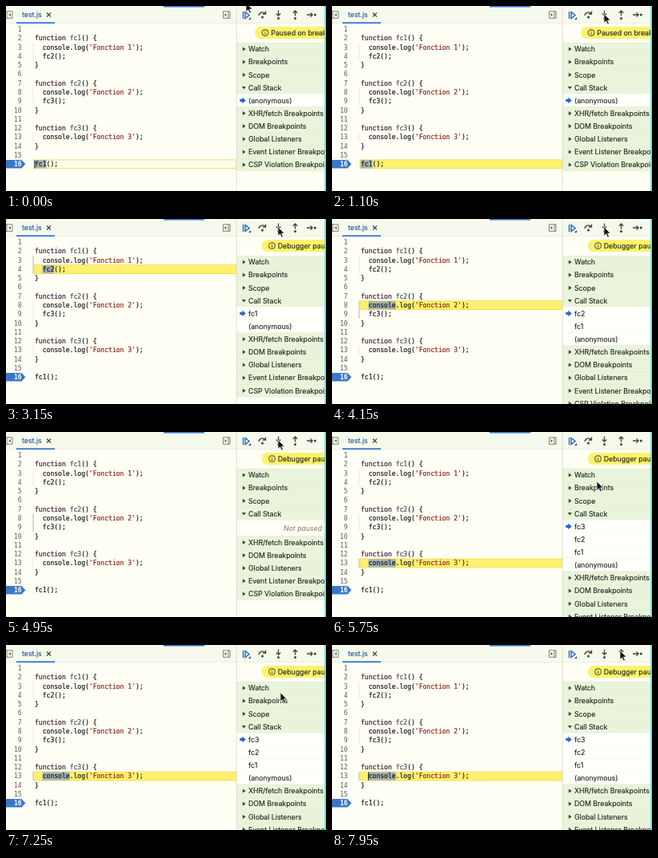
Recreate the animation shown at these times as an HTML page. Size 400x232 px, loop 8 s.

```html
<!DOCTYPE html>
<html lang="fr">
<head>
<meta charset="utf-8">
<title>Debugger</title>
<style>
  html, body { margin: 0; width: 100%; height: 100%; overflow: hidden; background: #fffff5; }
  svg { display: block; width: 100vw; height: 100vh; }
  text { white-space: pre; }
  .ui { font: 8.75px Inter, Roboto, sans-serif; fill: #1c1e19; stroke: #1c1e19; stroke-width: .12; }
  .code { font: 8.05px "DejaVu Sans Mono", monospace; fill: #1b1b18; stroke: #1b1b18; stroke-width: .2; }
  .num { font: 8.05px "DejaVu Sans Mono", monospace; fill: #5f5f58; text-anchor: end; }
  .kw { fill: #38182f; stroke: #38182f; }
  .def { fill: #41525c; stroke: #41525c; }
  .str { fill: #8c2214; stroke: #8c2214; }
  .icon { fill: none; stroke: #3f423c; stroke-width: 1.3; }
  .thin { fill: none; stroke: #74766a; stroke-width: .9; }
</style>
</head>
<body>
<svg id="stage" viewBox="0 0 400 232"></svg>
<script>
const LOOP = 8000, GAP = 70;
const CHAR = 4.845, LEFT = 36, ROW = 16.15;

const code = [
  "",
  "function fc1() {", "  console.log('Fonction 1');", "  fc2();", "}", "",
  "function fc2() {", "  console.log('Fonction 2');", "  fc3();", "}", "",
  "function fc3() {", "  console.log('Fonction 3');", "}", "",
  "fc1();"
];

const steps = [
  { at: 0, line: 16, word: [0, 3], stack: [] },
  { at: 1800, line: 3, word: [2, 7], stack: ["fc1"], body: [3, 4] },
  { at: 2550, line: 4, word: [2, 3], stack: ["fc1"], body: [3, 4] },
  { at: 3500, line: 8, word: [2, 7], stack: ["fc2", "fc1"], body: [8, 9] },
  { at: 4300, line: 9, word: [2, 3], stack: ["fc2", "fc1"], body: [8, 9] },
  { at: 5000, line: 13, word: [2, 7], stack: ["fc3", "fc2", "fc1"], body: [13, 13] }
];

// Pointer tip: time, x, y
const path = [
  [0, 300, -4], [850, 340, 10], [5400, 340, 10],
  [6200, 318, 137], [6800, 318, 137], [7600, 360, 7], [LOOP, 360, 7]
];

const lineY = n => 29.2 + (n - 1) * 11.27;
const rect = (x, y, w, h, fill, more = "") =>
  `<rect x="${x}" y="${y}" width="${w}" height="${h}" fill="${fill}" ${more}/>`;
const text = (x, y, s, cls = "ui", more = "") =>
  `<text x="${x}" y="${y}" class="${cls}" ${more}>${s}</text>`;
const draw = (d, more = "") => `<path d="${d}" ${more}/>`;

function paint(src) {
  return src.replace(/'[^']*'|\bfunction\b|fc\d(?=\(\) \{)/g, t => {
    const cls = t[0] === "'" ? "str" : t === "function" ? "kw" : "def";
    return `<tspan class="${cls}">${t}</tspan>`;
  });
}

function codeText() {
  return code.map((src, i) => {
    const n = i + 1, y = lineY(n) + 2.9;
    const indent = src.length - src.trimStart().length;
    const white = n === 16 ? 'style="fill:#fff;font-weight:bold"' : "";
    return text(19.6, y, n, "num", white) +
      text(LEFT + indent * CHAR, y, paint(src.trim()), "code");
  }).join("");
}

function guide([a, b], color) {
  return rect(33.5, lineY(a) - 5.6, 1, lineY(b) - lineY(a) + 11.2, color);
}

function panelIcon(x, flip) {
  const bar = flip ? x + 6.5 : x + 1.5;
  const tri = flip ? `M${x + 2} 9l2.6 2l-2.6 2z` : `M${x + 6.3} 9l-2.6 2l2.6 2z`;
  return draw(`M${x} 6.8h8.5v8.5h-8.5zM${bar} 6.8v8.5`, 'class="thin"') + draw(tri, 'fill="#5a5c50"');
}

function toolbar() {
  const dot = (x, y) => `<circle cx="${x}" cy="${y}" r="1.5" fill="#3f423c"/>`;
  const icon = d => draw(d, 'class="icon"');
  return draw("M296.5 7v9M299 7.5v8l5-4z", 'fill="none" stroke="#2467cc" stroke-width="1.4"') +
    draw("M306 14v3h-3z", 'fill="#3f423c"') +
    icon("M316 12a4.6 4.6 0 0 1 8-2.5M324.5 6.5v3.5h-3.5") + dot(320.5, 14) +
    icon("M340.5 5.5v6.5M337.8 9.5l2.7 2.7l2.7-2.7") + dot(340.5, 15.5) +
    icon("M361.5 12.5v-6.5M358.8 8.7l2.7-2.7l2.7 2.7") + dot(361.5, 15.5) +
    icon("M376 11h7M380.5 8.4l2.6 2.6l-2.6 2.6") + dot(386.3, 11);
}

function backdrop() {
  return rect(0, 0, 400, 232, "#fffff5") +
    rect(0, 0, 400, 22, "#f5faec") + rect(0, 21.5, 400, .6, "#e2e8d8") +
    rect(197, 0, 51, 1.5, "#2f72d6") +
    rect(13, 20.3, 48, 1.7, "#2f72d6") +
    text(20, 14.3, "test.js", "ui", 'style="fill:#1f4f96;stroke:#1f4f96"') +
    draw("M51 8.5l5 5M56 8.5l-5 5", 'class="icon" style="stroke-width:1.1"') +
    panelIcon(-.5, false) + panelIcon(271.5, true);
}

function section(y, label, open) {
  const tri = open ? `M294.8 ${y - 1.5}h5l-2.5 3.5z` : `M295.8 ${y - 2.6}v5.2l3.8-2.6z`;
  return rect(288, y - 8, 112, ROW, "#e9f4da") + rect(288, y - 8, 112, .5, "#dce8cc") +
    draw(tri, 'fill="#3f423c"') + text(303, y + 3.2, label);
}

function banner(first) {
  const x = first ? 311 : 319.5;
  return rect(x, 26, 120, 15, "#fdf36c", 'rx="7.5"') +
    `<circle cx="${x + 13}" cy="33.5" r="4" class="icon" style="stroke-width:1"/>` +
    draw(`M${x + 13} 31.2v.9M${x + 13} 33v2.7`, 'class="icon" style="stroke-width:1"') +
    text(x + 20.3, 36.7, first ? "Paused on breakpoint" : "Debugger paused");
}

function sidebar(step, paused, hover) {
  let out = rect(288, 22, 112, 210, "#fffff5") + banner(step.at === 0);
  ["Watch", "Breakpoints", "Scope", "Call Stack"].forEach((s, i) => {
    out += section(54 + i * ROW, s, i === 3);
  });
  let y = 118.4;
  if (paused) {
    [...step.stack, "(anonymous)"].forEach((s, i) => {
      out += rect(288, y - 8, 112, ROW, i === hover ? "#fbf9c8" : "#fffffc") +
        rect(288, y + 7.7, 112, .5, "#eeeee4");
      if (i === 0) out += draw(`M292.3 ${y - 1.6}h3v-2.2l4.4 3.8l-4.4 3.8v-2.2h-3z`, 'fill="#2467cc"');
      out += text(303, y + 3.2, s);
      y += ROW;
    });
  } else {
    out += text(347, y + 5.2, "Not paused", "ui", 'style="font-style:italic;fill:#77786a;stroke:none"');
    y += 20;
  }
  ["XHR/fetch Breakpoints", "DOM Breakpoints", "Global Listeners",
    "Event Listener Breakpoints", "CSP Violation Breakpoints"].forEach((s, i) => {
    out += section(y + i * ROW, s);
  });
  return out + rect(287.7, 0, .8, 232, "#d5dac6") + rect(398.2, 0, 1.8, 232, "#55e6ee");
}

function editor(step, paused, pale, caret) {
  const y = lineY(step.line), x = LEFT + step.word[0] * CHAR;
  let out = [[3, 4], [8, 9], [13, 13]].map(b => guide(b, "#e9eadb")).join("");
  if (step.body) out += guide(step.body, "#bfc1a2");
  if (paused) {
    out += rect(35, y - 5.3, 253, 10.8, pale ? "#fffdec" : "#fff170", 'stroke="#f7dc4a" stroke-width=".9"') +
      rect(x - .3, y - 5, step.word[1] * CHAR + .4, 10.2, "#a2b3b4");
  }
  const t = lineY(16);
  out += draw(`M0 ${t - 5.2}h19.5l4.8 5.2l-4.8 5.2h-19.5z`, 'fill="#3878c7"') + codeText();
  if (paused && caret) out += rect(x - .6, y - 5, 1, 10.2, "#20201c");
  return out;
}

const stage = document.getElementById("stage");
stage.innerHTML = backdrop() +
  '<g id="editor"></g><g id="side"></g>' + toolbar() +
  draw("M0 0v11.2l2.6-2.4l1.9 4.2l1.9-.8l-1.9-4.2h3.6z",
    'id="pointer" fill="#111" stroke="#fff" stroke-width=".7"');
const [editorBox, sideBox, pointer] = ["editor", "side", "pointer"].map(id => document.getElementById(id));

function pointerAt(t) {
  const i = path.findIndex((p, k) => k && t <= p[0]);
  const [t0, x0, y0] = path[i - 1], [t1, x1, y1] = path[i];
  const u = (t - t0) / (t1 - t0), e = u * u * (3 - 2 * u);
  return [x0 + (x1 - x0) * e, y0 + (y1 - y0) * e];
}

let shown = "";
function render(t) {
  const index = steps.filter(s => s.at - GAP <= t).length - 1;
  // While the script runs, the previous step stays on screen without its highlight.
  const paused = t >= steps[index].at;
  const step = paused ? steps[index] : steps[index - 1];
  const [x, y] = pointerAt(t);
  const hover = x > 288 ? Math.floor((y - 110.4) / ROW) : -1;
  const caret = (t - step.at) % 1200 < 600;
  const pale = t < 150;
  const key = [index, paused, hover, caret, pale].join();
  if (key !== shown) {
    shown = key;
    editorBox.innerHTML = editor(step, paused, pale, caret);
    sideBox.innerHTML = sidebar(step, paused, hover);
  }
  pointer.setAttribute("transform", `translate(${x.toFixed(2)} ${y.toFixed(2)})`);
}

const start = performance.now();
function tick() {
  render((performance.now() - start) % LOOP);
  requestAnimationFrame(tick);
}
tick();
</script>
</body>
</html>
```
